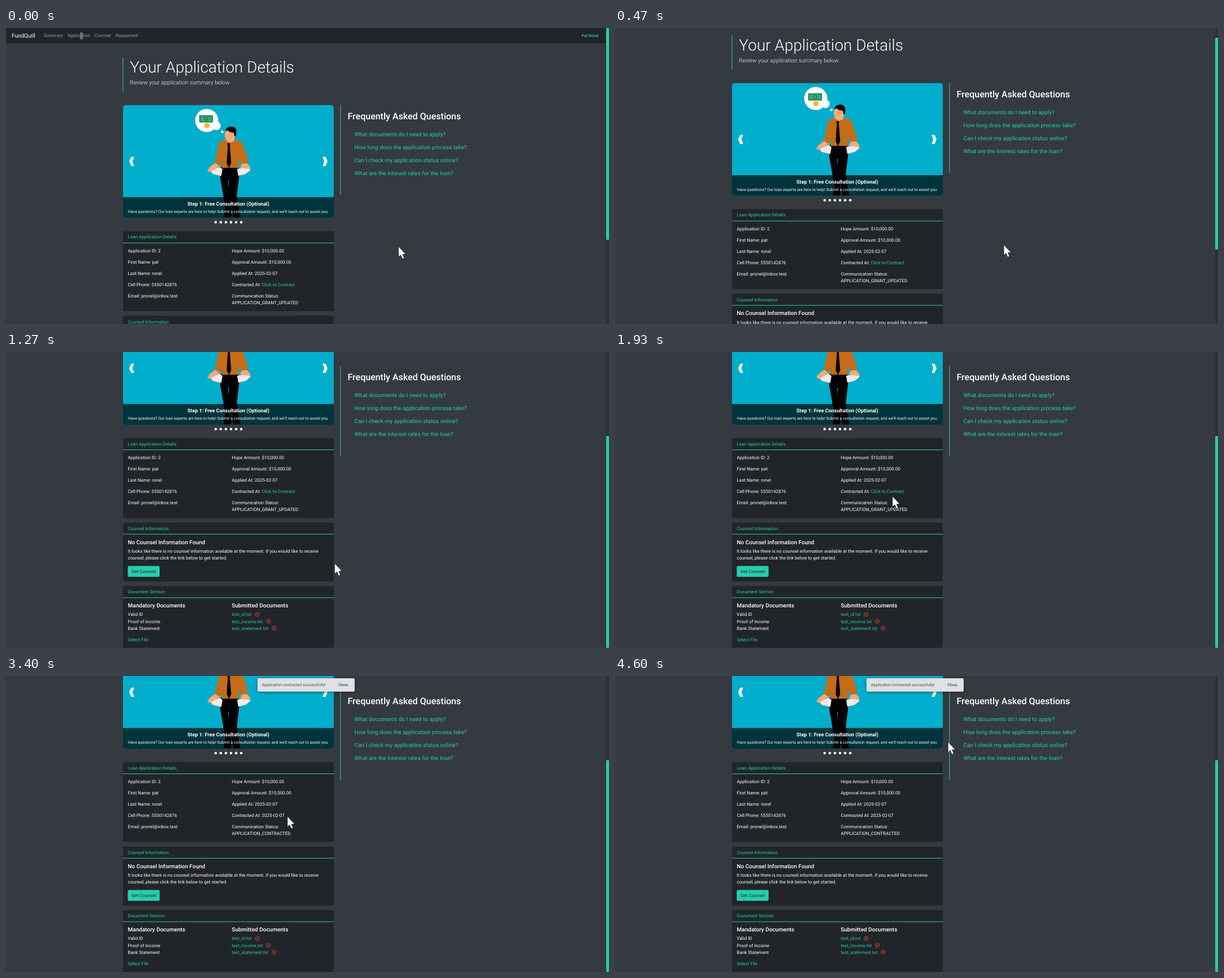
These frames come from a looping animation (1067 by 525 pixels, 5200 ms). An HTML page:

```html
<!DOCTYPE html>
<html lang="en">
<head>
<meta charset="utf-8">
<title>Application details</title>
<style>
  html, body { margin: 0; width: 100%; height: 100%; overflow: hidden; background: #343a40; }
  svg { display: block; width: 100%; height: 100%; }
  text { font: 400 8px Roboto, sans-serif; fill: #fff; text-rendering: geometricPrecision; white-space: pre; }
  .teal { fill: #26ceac; }
  .line { stroke: #26ceac; stroke-width: 1; }
  .card { fill: #212529; }
  .nav { fill: #9b9d9f; }
  .brand { font-size: 10px; }
  .user { font-size: 7px; font-weight: 500; text-anchor: end; }
  .title { font-size: 28px; font-weight: 300; }
  .lead { font-size: 10px; font-weight: 300; }
  .faq { font-size: 16px; font-weight: 500; }
  .question { font-size: 10px; }
  .step { font-size: 9px; font-weight: 700; text-anchor: middle; }
  .note { font-size: 7px; text-anchor: middle; }
  .heading { font-size: 10px; font-weight: 500; }
  .dark { fill: #212529; }
  .remove { fill: none; stroke: #d9402f; stroke-width: 1; }
  .skin { fill: #fba879; }
  .shirt { fill: #c46c17; }
  .lining { fill: #fbe9ea; }
  .pointer { fill: #fff; stroke: #1b1d20; stroke-width: .7; stroke-linejoin: round; }
  #snack { transform-origin: 531px 16px; }
  #snack rect { fill: #dfe1e2; filter: drop-shadow(0 1.5px 2px #0008); }
  #snack text { font-size: 7px; fill: #4a4c4e; }
  #snack .close { fill: #16695c; font-weight: 500; }
</style>
</head>
<body>
<svg viewBox="0 0 1067 525">
  <defs>
    <g id="cross" class="remove">
      <circle r="3.6"/>
      <path d="M-1.4-1.4 1.4 1.4M1.4-1.4-1.4 1.4"/>
    </g>
    <path id="chevron" fill="#fff" d="M221.5 228.5H226.8L223.6 236.5 226.8 244.7H221.5L218 236.5Z"/>
    <clipPath id="slide"><rect x="207" y="136.7" width="373" height="200" rx="5"/></clipPath>
  </defs>

  <g id="page">
    <rect class="card" width="1062" height="27.5"/>
    <text class="brand" x="10" y="17">FundQuill</text>
    <text class="nav" x="66.7" y="16.4">Summary</text>
    <text class="nav" x="108.8" y="16.4">Application</text>
    <text class="nav" x="156.8" y="16.4">Counsel</text>
    <text class="nav" x="193.8" y="16.4">Repayment</text>
    <rect x="131" y="8" width="5" height="12" fill="#73777a" opacity=".9"/>
    <text class="user teal" x="1048.5" y="16.2">Pat Ronel</text>

    <path class="line" d="M207 52V112.5"/>
    <text class="title" x="219.3" y="78.6">Your Application Details</text>
    <text class="lead" x="219.3" y="100">Review your application summary below.</text>

    <g clip-path="url(#slide)">
      <rect x="207" y="136" width="373" height="202" fill="#00aecb"/>
      <g fill="#fff">
        <circle cx="355.2" cy="164" r="20.5"/>
        <circle cx="372.5" cy="173.5" r="7.5"/>
        <circle cx="382.8" cy="184.3" r="2.2"/>
      </g>
      <rect x="342" y="154.8" width="24.2" height="12.8" fill="#1f7d5a"/>
      <rect x="344" y="156.6" width="20.2" height="9.2" fill="#35a876"/>
      <circle cx="354.1" cy="161.2" r="3.4" fill="#1f7d5a"/>
      <path d="M354.1 159V163.4" stroke="#8fd6ae"/>
      <circle cx="355.4" cy="173" r="4.6" fill="#f8b818"/>

      <path d="M380 246H411L412.5 263 408.5 298 413 330 415 336H402L397 300 399 330 398 336H385L388 318 384.5 298 379 266Z"/>
      <path fill="#00aecb" d="M393 272 394.5 270 393.5 284Z"/>
      <path class="lining" d="M361 253 378 246.5 383 250 381 262.5 366 259Z"/>
      <path class="lining" d="M409 250 431 246 432.5 252 424 259 411 262Z"/>
      <path class="skin" d="M372 238 380 244 371 249 361 255.5 356 253.5 360 247Z"/>
      <path class="skin" d="M424 237 432 246 432.5 251 424 249 414 247.5 417 241Z"/>
      <path class="shirt" d="M390 198 379 201.5Q375.5 204 375 213L369.5 239 378 245 381.5 234V248H411.5L412 232 416 241 426.5 240Q429 236 426.5 228L418.5 204Q417 201 404 198Z"/>
      <path class="skin" d="M389 180 405 184 405.5 191 403.5 201 394 204 392.5 201.5 389 199.5 387.3 192 387 188Z"/>
      <path d="M388.3 184Q388 176.5 396 175 405.5 173.5 407.5 181.5L406.8 192 404.5 192 403 185.5Q395 185.5 392 181Z"/>
      <path d="M391.5 205 394 203.5 396.5 205 396 210 398.5 240 394.5 248.5 390.5 240 392.5 210Z"/>

      <rect x="207" y="300" width="373" height="38" opacity=".7"/>
      <text class="step" x="393.5" y="314.7">Step 1: Free Consultation (Optional)</text>
      <text class="note" x="393.5" y="328.1">Have questions? Our loan experts are here to help! Submit a consultation request, and we'll reach out to assist you.</text>
      <use href="#chevron"/>
      <use href="#chevron" transform="matrix(-1 0 0 1 787 0)"/>
    </g>
    <path d="M371 344.5h46" stroke="#fff" stroke-width="4.6" stroke-linecap="round" stroke-dasharray="0 9.05"/>

    <rect class="card" x="207" y="360.5" width="373" height="141.8" rx="3"/>
    <text class="teal" x="215.5" y="373.4">Loan Application Details</text>
    <path class="line" d="M207 381.3H580"/>
    <text x="215.5" y="397.8">Application ID: 2</text>
    <text x="215.5" y="417.9">First Name: pat</text>
    <text x="215.5" y="437.9">Last Name: ronel</text>
    <text x="215.5" y="457.9">Cell Phone: 5550142876</text>
    <text x="215.5" y="477.9">Email: pronel@inbox.test</text>
    <text x="399.5" y="397.8">Hope Amount: $10,000.00</text>
    <text x="399.5" y="417.9">Approval Amount: $10,000.00</text>
    <text x="399.5" y="437.9">Applied At: 2025-02-07</text>
    <text x="399.5" y="457.9">Contracted At: <tspan id="contract"></tspan></text>
    <text x="399.5" y="477.9">Communication Status:</text>
    <text id="status" x="399.5" y="490"></text>

    <rect class="card" x="207" y="510.3" width="373" height="104.8" rx="3"/>
    <text class="teal" x="215.5" y="523.5">Counsel Information</text>
    <path class="line" d="M207 530.9H580"/>
    <text class="heading" x="215.5" y="548.4">No Counsel Information Found</text>
    <text x="215.5" y="564">It looks like there is no counsel information available at the moment. If you would like to receive</text>
    <text x="215.5" y="575.9">counsel, please click the link below to get started.</text>
    <rect class="teal" x="215.5" y="587.3" width="56.3" height="19.3" rx="2.6"/>
    <text class="dark" x="222" y="599.7">Get Counsel</text>

    <rect class="card" x="207" y="622.9" width="373" height="109.3" rx="3"/>
    <text class="teal" x="215.5" y="636.3">Document Section</text>
    <path class="line" d="M207 643.7H580"/>
    <text class="heading" x="215.5" y="661.2">Mandatory Documents</text>
    <text x="215.5" y="676.2">Valid ID</text>
    <text x="215.5" y="688.4">Proof of Income</text>
    <text x="215.5" y="700.6">Bank Statement</text>
    <text class="teal" x="215.5" y="720.7">Select File</text>
    <text class="heading" x="399.5" y="661.2">Submitted Documents</text>
    <text class="teal" x="399.5" y="676.2">test_id.txt</text>
    <text class="teal" x="399.5" y="688.4">test_income.txt</text>
    <text class="teal" x="399.5" y="700.6">test_statement.txt</text>
    <use href="#cross" x="444.5" y="673.3"/>
    <use href="#cross" x="464.2" y="685.5"/>
    <use href="#cross" x="474.3" y="697.7"/>
  </g>

  <g id="faq">
    <path class="line" d="M592 136.7V296"/>
    <text class="faq" x="604.5" y="161.8">Frequently Asked Questions</text>
    <text class="question teal" x="616.5" y="192.2">What documents do I need to apply?</text>
    <text class="question teal" x="616.5" y="215.3">How long does the application process take?</text>
    <text class="question teal" x="616.5" y="238.3">Can I check my application status online?</text>
    <text class="question teal" x="616.5" y="261.1">What are the interest rates for the loan?</text>
  </g>

  <rect x="1062" width="5" height="525" fill="#2b3036"/>
  <rect id="thumb" class="teal" x="1062" width="5" height="376" rx="2"/>

  <g id="snack">
    <rect x="445" y="4" width="172" height="23.8" rx="2.2"/>
    <text x="453" y="18.4">Application contracted successfully!</text>
    <text class="close" x="588" y="17.9">Close</text>
  </g>

  <g id="cursor">
    <path id="arrow" class="pointer" d="M0 0V18.5L4 15 6.8 21.8 10 20.4 7.2 13.9 12.6 13.5Z"/>
    <path id="hand" class="pointer" d="M-2 1.5Q0-1 2 1.5L3 8Q5 6.5 6.5 8.5 8.5 7.5 9.5 9.5 11.5 9 11.8 11.5L12 17Q11.5 20 10 21.5V24.5H0L-.5 21.5-6 15Q-7.5 12-5 12-3 12.5-.5 15.5Z"/>
  </g>
</svg>
<script>
  const LOOP = 5200, STEP = 200 / 3;   // the picture advances 15 times a second
  const CLICKED = 45, HOVER = 30;      // in steps
  const STICKY = 111.8;                // scroll after which the questions stay put

  // Tracks: [step, value, ...]
  const scrollTrack = [[5, 0], [6, 1], [7, 39], [8, 128], [9, 207.2], [10, 207.8]];
  const thumbTrack = [[5, 0], [6, .3], [7, 17], [8, 80], [9, 144], [10, 149]];
  const snackTrack = [[44, 0], [45, .3], [46, .8], [47, 1]];
  const cursorTrack = [
    [5, 694.5, 387.5], [6, 692, 387], [7, 688, 384.5], [9, 687, 377.5], [13, 681, 378],
    [16, 632, 378], [19, 581.7, 375], [20, 556, 344], [21, 527.5, 304.5], [22, 517, 287],
    [24, 503, 268], [29, 491, 256], [30, 493, 250], [35, 494, 249], [45, 494, 250],
    [51, 498, 249], [52, 513, 234], [53, 528, 214], [55, 568, 160], [57, 604, 100],
    [58, 611, 80], [59, 602, 67], [60, 589, 64], [63, 583, 42], [65, 585, 65],
    [67, 588, 101], [68, 589, 112], [69, 589.3, 117]
  ];

  const el = id => document.getElementById(id);
  const move = (id, x, y) => el(id).setAttribute('transform', `translate(${x} ${y})`);
  const show = (id, on) => { el(id).style.display = on ? '' : 'none'; };

  function sample(track, step) {
    const next = track.findIndex(key => key[0] > step);
    if (next < 0) return track[track.length - 1].slice(1);
    if (next === 0) return track[0].slice(1);
    const a = track[next - 1], b = track[next];
    const k = (step - a[0]) / (b[0] - a[0]);
    return a.slice(1).map((v, i) => v + (b[i + 1] - v) * k);
  }

  function draw(step) {
    const [scroll] = sample(scrollTrack, step);
    move('page', 0, -scroll);
    move('faq', 0, -Math.min(scroll, STICKY));
    move('thumb', 0, sample(thumbTrack, step)[0]);
    move('cursor', ...sample(cursorTrack, step));

    const hovering = step >= HOVER && step < CLICKED;
    show('hand', hovering);
    show('arrow', !hovering);

    const done = step >= CLICKED;
    el('contract').textContent = done ? '2025-02-07' : 'Click to Contract';
    el('contract').setAttribute('class', done ? '' : 'teal');
    el('status').textContent = done ? 'APPLICATION_CONTRACTED' : 'APPLICATION_GRANT_UPDATED';

    const [open] = sample(snackTrack, step);
    show('snack', open > 0);
    el('snack').style.opacity = open;
    el('snack').style.transform = `scale(${.8 + .2 * open})`;
  }

  const start = performance.now();
  let shown = -1;
  function tick() {
    const time = (performance.now() - start) % LOOP;
    const step = Math.floor((time + 3.4) / STEP) % 78;
    if (step !== shown) draw(shown = step);
    requestAnimationFrame(tick);
  }
  tick();
</script>
</body>
</html>
```
